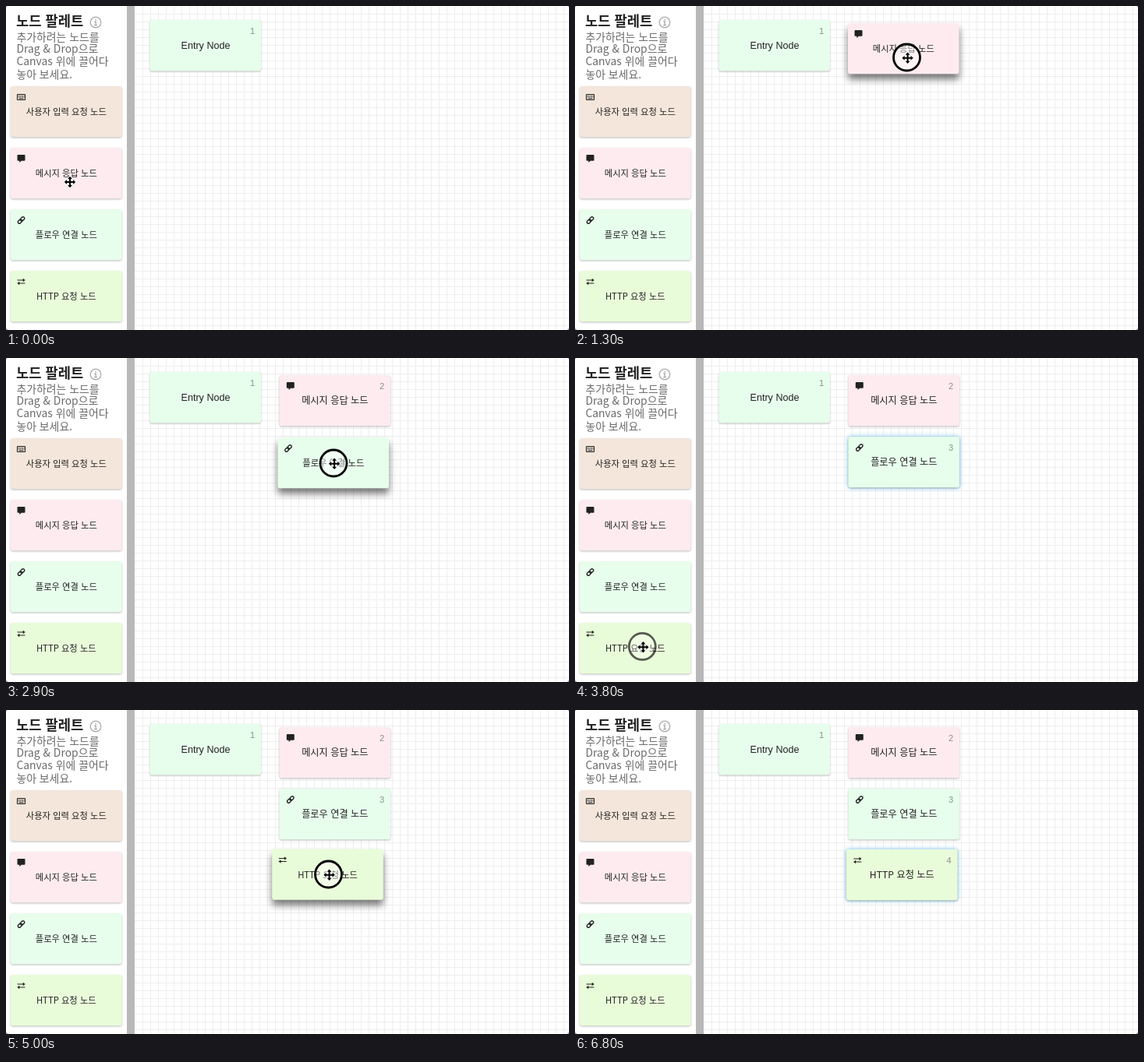
Animation of 722x416 px, one loop 6.9 s. Source, as an HTML page:

```html
<!DOCTYPE html>
<html lang="ko">
<head>
<meta charset="utf-8">
<title>노드 팔레트</title>
<style>
html, body { margin: 0; width: 100%; height: 100%; overflow: hidden; background: #fff; }
svg { display: block; width: 722px; height: 416px; }
text { font-family: "Noto Sans CJK KR", "Noto Sans CJK", "Noto Sans", sans-serif; fill: #222; }
.card { filter: drop-shadow(0 1px 1px rgba(0,0,0,.27)); }
.lift .card { filter: drop-shadow(0 7px 5px rgba(0,0,0,.52)); }
.glow { filter: drop-shadow(0 0 3px #7cc4f4); }
.intro { font-size: 13.9px; fill: #6a6a6a; }
.latin, .num { font-family: "Liberation Sans", Arial, sans-serif; }
.num { font-size: 11px; fill: #8a8f8c; }
.ink { fill: none; stroke: #222; }
</style>
</head>
<body>
<svg viewBox="0 0 722 416" xmlns="http://www.w3.org/2000/svg">
  <defs>
    <g id="keys">
      <rect class="ink" x="-5" y="-3.5" width="10" height="7" rx=".6" stroke-width="1.1"/>
      <path class="ink" d="M-3.6-1.6H4M-3.6 0H4" stroke-width="1" stroke-dasharray="1 .7"/>
      <path class="ink" d="M-3 1.8H3" stroke-width="1"/>
    </g>
    <path id="chat" fill="#222" d="M-4-5H4Q5-5 5-4V1.8Q5 2.8 4 2.8H.4L-2.2 5V2.8H-4Q-5 2.8-5 1.8V-4Q-5-5-4-5Z"/>
    <g id="link" class="ink" stroke-width="1.4" transform="rotate(-45)">
      <rect x="-5.2" y="-1.9" width="6" height="3.8" rx="1.9"/>
      <rect x="-.8" y="-1.9" width="6" height="3.8" rx="1.9"/>
    </g>
    <g id="swap" fill="#222">
      <path class="ink" d="M-5-2H3M-3 2H5" stroke-width="1.2"/>
      <path d="M2.2-4.2L5.2-2 2.2 .2ZM-2.2-.2L-5.2 2-2.2 4.2Z"/>
    </g>
  </defs>
  <rect width="722" height="416" fill="#fff"/>
  <path id="grid" fill="none" stroke="#eee"/>
  <rect x="155" width="10" height="416" fill="#b8b8b8"/>
  <text x="13" y="26.3" font-size="17.7" font-weight="700">노드 팔레트</text>
  <circle cx="115" cy="21" r="6.8" fill="none" stroke="#aaa" stroke-width="1.3"/>
  <path d="M115 17V18.8M113.4 20.3H115.2V24.6M113.2 24.6H117" fill="none" stroke="#aaa" stroke-width="1.4"/>
  <text class="intro" x="13.4" y="44.6">추가하려는 노드를</text>
  <text class="intro" x="13.4" y="60.4">Drag &amp; Drop으로</text>
  <text class="intro" x="13.4" y="76.4">Canvas 위에 끌어다</text>
  <text class="intro" x="13.4" y="92.6">놓아 보세요.</text>
  <g id="nodes"></g>
  <g id="cursor">
    <circle id="ring" cx="-.5" r="17" fill="#fff" fill-opacity=".42" stroke="#000" stroke-width="2.8"/>
    <path id="arrows" stroke="#fff" stroke-width="1.6" paint-order="stroke" stroke-linejoin="round"/>
  </g>
  <path d="M0 413V416H3Q.6 415.4 0 413ZM722 413V416H719Q721.4 415.4 722 413ZM0 2V0H2Q.4.4 0 2ZM722 2V0H720Q721.6.4 722 2Z" fill="#999"/>
</svg>
<script>
const LOOP = 6900, STEP = 100, CURSOR_GONE = 5800;
const TILE_X = 6, TILE_Y = 103, TILE_GAP = 79;
const $ = id => document.getElementById(id);

const tiles = [
  { label: '사용자 입력 요청 노드', color: '#f4e6da', icon: 'keys' },
  { label: '메시지 응답 노드', color: '#fdebef', icon: 'chat' },
  { label: '플로우 연결 노드', color: '#e7feec', icon: 'link' },
  { label: 'HTTP 요청 노드', color: '#e9fcd9', icon: 'swap' }
];
const entry = { label: 'Entry Node', color: '#e7feec' };

// the pointer presses at a, moves from go to done along a curve by via to b, releases at drop
const drags = [
  { tile: 1, press: 100, go: 380, done: 1180, drop: 1600, a: [82, 226], via: [254, 228], b: [426, 66], rest: [350.5, 22] },
  { tile: 2, press: 2040, go: 2040, done: 2790, drop: 3000, a: [78, 294], via: [60, 345], b: [420.5, 135], rest: [350.5, 101] },
  { tile: 3, press: 3710, go: 3710, done: 5010, drop: 5100, a: [78, 373], via: [246, 324], b: [414, 211], rest: [348, 179] }
];

const clamp = v => Math.max(0, Math.min(1, v));
const ease = u => 1 - (1 - u) ** 3 * (1 + 3 * u);
const tileY = i => TILE_Y + TILE_GAP * i;
const place = (g, x, y) => g.setAttribute('transform', `translate(${x} ${y})`);
const show = (g, on) => g.setAttribute('visibility', on ? 'visible' : 'hidden');

function glide(a, via, b, t, from, to) {
  const s = ease(clamp((t - from) / (to - from))), r = 1 - s;
  return [0, 1].map(k => r * r * a[k] + 2 * r * s * via[k] + s * s * b[k]);
}

function cursorAt(t) {
  const i = drags.findIndex((m, n) => !drags[n + 1] || t < drags[n + 1].press);
  const m = drags[i], next = drags[i + 1];
  if (t < m.drop || !next) return glide(m.a, m.via, m.b, t, m.go, m.done);
  return glide(m.b, [m.b[0] + 120, m.b[1] + 60], next.a, t, m.drop - STEP, next.press);
}

function card(kind, num) {
  const g = document.createElementNS('http://www.w3.org/2000/svg', 'g');
  const rect = cls => `<rect class="${cls}" width="142.5" height="65.3" rx="3" fill="${kind.color}"/>`;
  const text = kind.icon
    ? `<text x="71.3" y="37.4" font-size="${num ? 12.2 : 11.3}" text-anchor="middle">${kind.label}</text>`
    : `<text class="latin" x="71.5" y="37" font-size="12.6" text-anchor="middle">${kind.label}</text>`;
  g.innerHTML = (num > 1 ? rect('glow') : '') + rect('card') + text +
    (kind.icon ? `<use href="#${kind.icon}" transform="translate(${num ? 14.3 : 13.5} 14)"/>` : '') +
    (num ? `<text class="num" x="131.5" y="18" text-anchor="middle">${num}</text>` : '');
  $('nodes').append(g);
  return g;
}

function build() {
  let lines = '';
  const cell = 10;
  for (let x = 165.5 + cell; x < 722; x += cell) lines += `M${x} 0V416`;
  for (let y = cell + .5; y < 416; y += cell) lines += `M165 ${y}H722`;
  $('grid').setAttribute('d', lines);

  let arrows = 'M-1-5H1V-1H5V1H1V5H-1V1H-5V-1H-1Z';
  for (const [x, y] of [[0, -1], [1, 0], [0, 1], [-1, 0]]) {
    const px = -y * 3, py = x * 3;
    arrows += `M${x * 7.2} ${y * 7.2}L${x * 4 + px} ${y * 4 + py}L${x * 4 - px} ${y * 4 - py}Z`;
  }
  $('arrows').setAttribute('d', arrows);

  tiles.forEach((kind, i) => place(card(kind), TILE_X, tileY(i)));
  place(card(entry, 1), 184.5, 18);
  drags.forEach((m, i) => {
    m.node = card(tiles[m.tile], i + 2);
    m.glow = m.node.querySelector('.glow');
    m.blur = drags[i + 1] ? drags[i + 1].press + STEP : LOOP;
    place(m.node, ...m.rest);
  });
  for (const m of drags) {
    m.lifted = card(tiles[m.tile]);
    m.lifted.setAttribute('class', 'lift');
  }
}

function draw(t) {
  // a lifted card trails the pointer by one step
  const [lagX, lagY] = cursorAt(Math.max(0, t - STEP));
  for (const m of drags) {
    place(m.lifted, TILE_X + lagX - m.a[0], tileY(m.tile) + lagY - m.a[1]);
    show(m.lifted, t >= m.go + STEP && t < m.drop);
    show(m.node, t >= m.drop);
    m.glow.setAttribute('opacity', clamp(1 - (t - m.blur) / 200));
  }
  const held = drags.find(m => t >= m.press && t < m.drop);
  place($('cursor'), ...cursorAt(t));
  show($('cursor'), t < CURSOR_GONE);
  $('ring').setAttribute('opacity', held ? clamp((t - held.press + STEP) / 300) : 0);
  place($('arrows'), held ? .6 : 0, held ? .8 : 0);
}

build();
const start = performance.now();
function tick() {
  const t = (performance.now() - start) % LOOP;
  draw(Math.floor(t / STEP) * STEP);
  requestAnimationFrame(tick);
}
tick();
</script>
</body>
</html>
```
